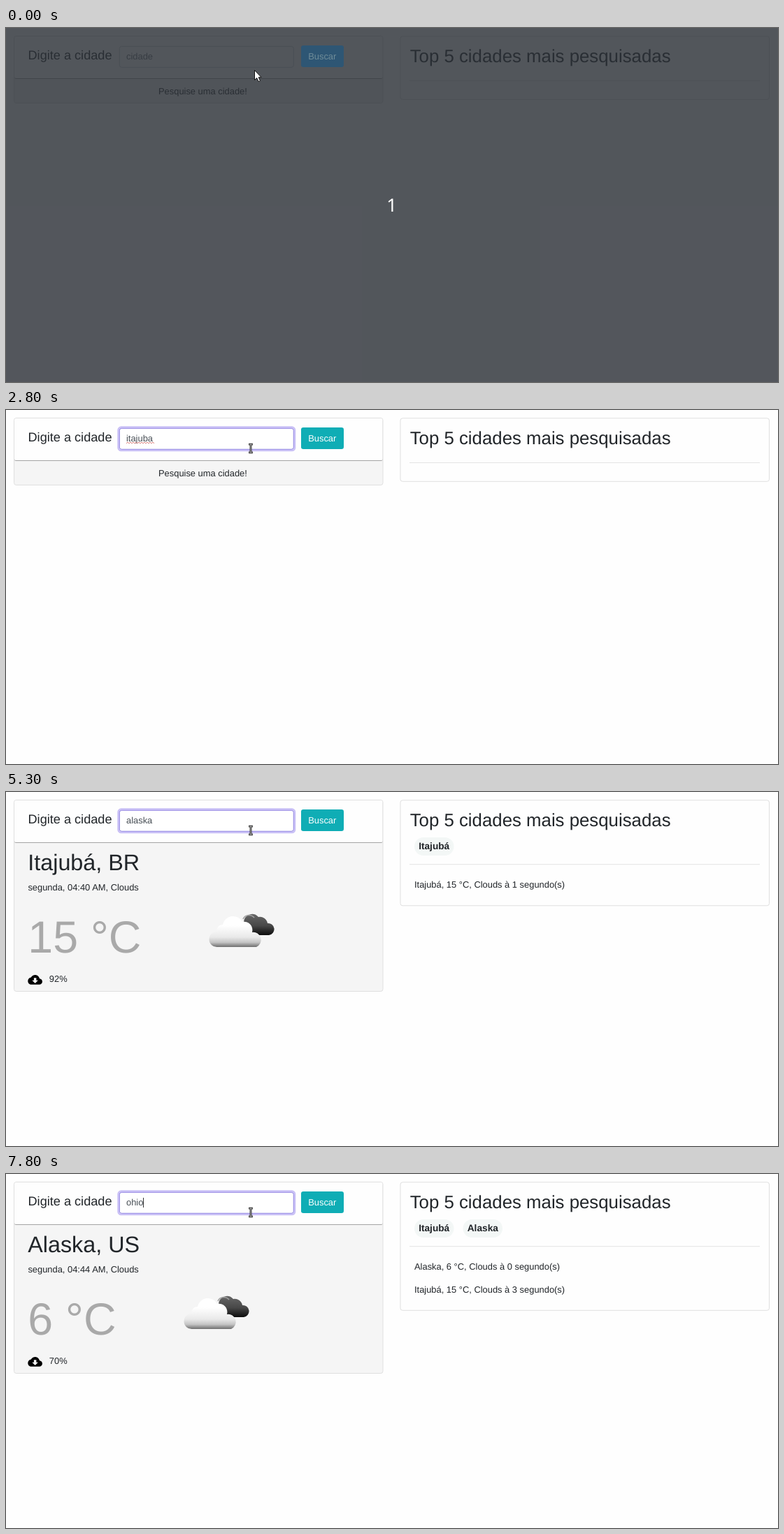
Animation of 1104 by 507 pixels, one loop 8000 ms. Source, as an HTML page:

```html
<!DOCTYPE html>
<html lang="pt-BR">
<head>
<meta charset="utf-8">
<title>Previsão por cidade</title>
<style>
  html, body { margin: 0; width: 100%; height: 100%; overflow: hidden; background: #fefefe; }
  svg { display: block; width: 1104px; height: 507px; }
  text { font: 12.9px "Liberation Sans", Arial, sans-serif; fill: #212529; white-space: pre; text-rendering: geometricPrecision; }
  .label { font-size: 18.15px; }
  .title { font-size: 25.8px; }
  .city { font-size: 32.3px; }
  .temp { font-size: 64.5px; fill: #a9a9a9; }
  .tag { font-size: 13.7px; font-weight: bold; text-anchor: middle; }
  .count { font: 26px "Noto Sans", "Open Sans", sans-serif; fill: #fff; text-anchor: middle; }
  .card { fill: #fefefe; stroke: #dfdfdf; }
  .rule { stroke: #e3e3e3; }
  .pill { fill: #f3f7f6; }
</style>
</head>
<body>
<svg viewBox="0 0 1104 507">
  <defs>
    <linearGradient id="light" x2="0" y2="1">
      <stop offset=".3" stop-color="#fff"/><stop offset=".68" stop-color="#e9e9e9"/>
      <stop offset=".85" stop-color="#c4c4c4"/><stop offset="1" stop-color="#6e6e6e"/>
    </linearGradient>
    <linearGradient id="dark" x2="0" y2="1">
      <stop offset="0" stop-color="#666"/><stop offset=".55" stop-color="#484848"/>
      <stop offset="1" stop-color="#0c0c0c"/>
    </linearGradient>
    <filter id="soft"><feGaussianBlur stdDeviation=".6"/></filter>
    <filter id="shade" x="-2%" y="-10%" width="104%" height="120%">
      <feDropShadow dx="0" dy=".6" stdDeviation=".6" flood-color="#000" flood-opacity=".55"/>
    </filter>
  </defs>

  <rect width="1104" height="507" fill="#fefefe"/>

  <rect id="leftCard" class="card" x="11.5" y="11.5" width="527.5" rx="3.2" style="fill:#f5f5f5"/>
  <rect x="12" y="12" width="526.6" height="60" rx="2.5" fill="#fefefe" filter="url(#shade)"/>
  <text class="label" x="31.5" y="45.3">Digite a cidade</text>
  <rect x="162.3" y="26.3" width="249" height="30" rx="3.2" fill="#fff" stroke="#ced4da"/>
  <g id="focus" fill="none">
    <rect x="160.7" y="24.7" width="252.2" height="33.2" rx="4" stroke="#cac1f6" stroke-width="2.8"/>
    <rect x="162.3" y="26.3" width="249" height="30" rx="3" stroke="#9a8bea"/>
  </g>
  <rect id="selection" x="172" y="34" height="15" fill="#3390ff"/>
  <text id="field" x="172" y="45.4"></text>
  <path id="squiggle" fill="none" stroke="#d9807c"/>
  <rect id="caret" y="34" width="1" height="14" fill="#333"/>

  <text id="hint" x="218" y="95.3">Pesquise uma cidade!</text>
  <g id="weather">
    <text id="city" class="city" x="31.3" y="112.3"></text>
    <text id="when" x="31.4" y="140.5"></text>
    <text id="temp" class="temp" x="31.3" y="230.3"></text>
    <g id="clouds" filter="url(#soft)">
      <path fill="url(#dark)" d="M340 187A12 12 0 0 1 361 179A11 11 0 0 1 374 188A8.5 8.5 0 0 1 376 205H350Z"/>
      <path fill="none" stroke="#a2a2a2" stroke-width="1.6" d="M339 182A9.5 9.5 0 0 1 355 180"/>
      <path fill="url(#light)" d="M302 222A11 11 0 0 1 301 200A9 9 0 0 1 310 190A15 15 0 0 1 338 186A12 12 0 0 1 352 201A11 11 0 0 1 358 222Z"/>
    </g>
    <path transform="translate(31.3 258.6) scale(.86)" d="M19.35 10.04C18.67 6.59 15.64 4 12 4 9.11 4 6.6 5.64 5.35 8.04 2.34 8.36 0 10.91 0 14c0 3.31 2.69 6 6 6h13c2.76 0 5-2.24 5-5 0-2.64-2.05-4.78-4.65-4.96zM17 13l-5 5-5-5h3V9h4v4h3z"/>
    <text id="humidity" x="61.8" y="272.4"></text>
  </g>

  <rect id="rightCard" class="card" x="564" y="11.8" width="527.5" rx="3.2"/>
  <text class="title" x="577.7" y="49.3">Top 5 cidades mais pesquisadas</text>
  <path id="rule" class="rule" d="M577 0H1078"/>
  <g id="tags">
    <g><rect class="pill" x="584" y="65" width="56.5" height="26" rx="13"/><text class="tag" x="612.2" y="82">Itajubá</text></g>
    <g><rect class="pill" x="653.5" y="65" width="56.5" height="26" rx="13"/><text class="tag" x="681.8" y="82">Alaska</text></g>
  </g>
  <text id="row0" x="584" y="137.4"></text>
  <text id="row1" x="584" y="169.9"></text>

  <g id="overlay">
    <rect width="1104" height="507" fill="rgb(44,48,55)" fill-opacity=".815"/>
    <text class="count" x="551.7" y="263">1</text>
  </g>
  <rect id="button" x="422" y="25" width="61" height="31" rx="3.2"/>
  <text id="buttonText" x="432.2" y="44.8">Buscar</text>

  <path id="arrow" fill="#fff" stroke="#111" stroke-linejoin="round" d="M0 0V14L3.2 11 5.6 16.2 8 15 5.7 10.2H9.6Z"/>
  <g id="beam" fill="none">
    <path stroke="#222" stroke-width="2.8" d="M-2.8-5.8H2.8M0-5.8V5.8M-2.8 5.8H2.8"/>
    <path stroke="#ccc" stroke-width=".9" d="M-2-5.8H2M0-5.8V5.8M-2 5.8H2"/>
  </g>
</svg>
<script>
const LOOP = 8000, FIELD_X = 172;
const $ = id => document.getElementById(id);

const itajuba = { city: 'Itajubá, BR', when: 'segunda, 04:40 AM, Clouds', temp: '15 °C', humidity: '92%', shift: 0 };
const alaska = { city: 'Alaska, US', when: 'segunda, 04:44 AM, Clouds', temp: '6 °C', humidity: '70%', shift: -36 };
const blank = { city: '', when: '', temp: '', humidity: '', shift: 0 };

const initial = {
  dim: true, cursor: 'arrow', at: [355.5, 60.5], focus: 0,
  text: '', caret: false, selected: false, misspelt: false,
  weather: null, rows: []
};
const typed = text => ({ text, caret: true, selected: false, misspelt: false });

// Each step changes part of the state from its time on.
const steps = [
  [100, { dim: false, at: [355, 60.5] }],
  [200, { at: [354, 58] }],
  [300, { cursor: 'beam', at: [351, 55] }],
  [400, { at: [350, 54] }],
  [600, { at: [350, 55], focus: .4, caret: true }],
  [700, { focus: .8 }],
  [800, { focus: 1 }],
  [1300, { caret: false }],
  [1400, typed('i')],
  [1500, typed('it')],
  [1600, typed('itaj')],
  [1700, typed('itaju')],
  [1800, typed('itajuba')],
  [2400, { caret: false }],
  [2800, { misspelt: true }],
  [3100, { weather: itajuba, caret: true }],
  [3500, { rows: ['Itajubá, 15 °C, Clouds à 1 segundo(s)'] }],
  [3600, { selected: true, caret: false }],
  [4100, typed('a')],
  [4300, typed('al')],
  [4400, typed('ala')],
  [4600, typed('alas')],
  [4700, typed('alaska')],
  [5300, { caret: false }],
  [5700, { weather: alaska, misspelt: true }],
  [5900, { caret: true, rows: ['Alaska, 6 °C, Clouds à 0 segundo(s)', 'Itajubá, 15 °C, Clouds à 3 segundo(s)'] }],
  [6700, { selected: true, caret: false }],
  [7400, typed('o')],
  [7600, typed('oh')],
  [7800, typed('ohio')]
];

const show = (id, on) => { $(id).style.display = on ? '' : 'none'; };
const set = (id, name, value) => $(id).setAttribute(name, value);
const write = (id, text) => { $(id).textContent = text; };

function drawField(s) {
  write('field', s.text || 'cidade');
  $('field').style.fill = s.selected ? '#fff' : s.text ? '#495057' : '#6c757d';
  const width = s.text ? $('field').getComputedTextLength() : 0;
  set('caret', 'x', Math.floor(FIELD_X + width + .5));
  set('selection', 'width', width);
  set('squiggle', 'd', `M${FIELD_X} 47.8` + 'l2-1.6 2 1.6'.repeat(Math.round(width / 4)));
  set('focus', 'opacity', s.focus);
  show('caret', s.caret);
  show('selection', s.selected);
  show('squiggle', s.misspelt);
}

function drawCards(s) {
  const { shift, ...labels } = s.weather || blank;
  for (const id in labels) write(id, labels[id]);
  set('clouds', 'transform', `translate(${shift})`);
  set('leftCard', 'height', s.weather ? 274 : 96);
  show('weather', s.weather);
  show('hint', !s.weather);

  const count = s.rows.length;
  set('rightCard', 'height', count ? 118.5 + 32.5 * count : 90.5);
  set('rule', 'transform', `translate(0 ${count ? 103.7 : 75.5})`);
  [0, 1].forEach(i => {
    write('row' + i, s.rows[i] || '');
    $('tags').children[i].style.display = i < count ? '' : 'none';
  });
}

function draw(s) {
  drawField(s);
  drawCards(s);
  show('overlay', s.dim);
  set('button', 'fill', s.dim ? '#2e5674' : '#0fadb5');
  $('buttonText').style.fill = s.dim ? '#6f8c98' : '#fff';
  for (const id of ['arrow', 'beam']) {
    show(id, s.cursor === id);
    set(id, 'transform', `translate(${s.at})`);
  }
}

const start = performance.now();
let drawn = -1;
function tick() {
  const t = (performance.now() - start) % LOOP;
  const past = steps.filter(([time]) => time <= t);
  if (past.length !== drawn) {
    drawn = past.length;
    draw(Object.assign({}, initial, ...past.map(([, change]) => change)));
  }
  requestAnimationFrame(tick);
}
tick();
</script>
</body>
</html>
```
